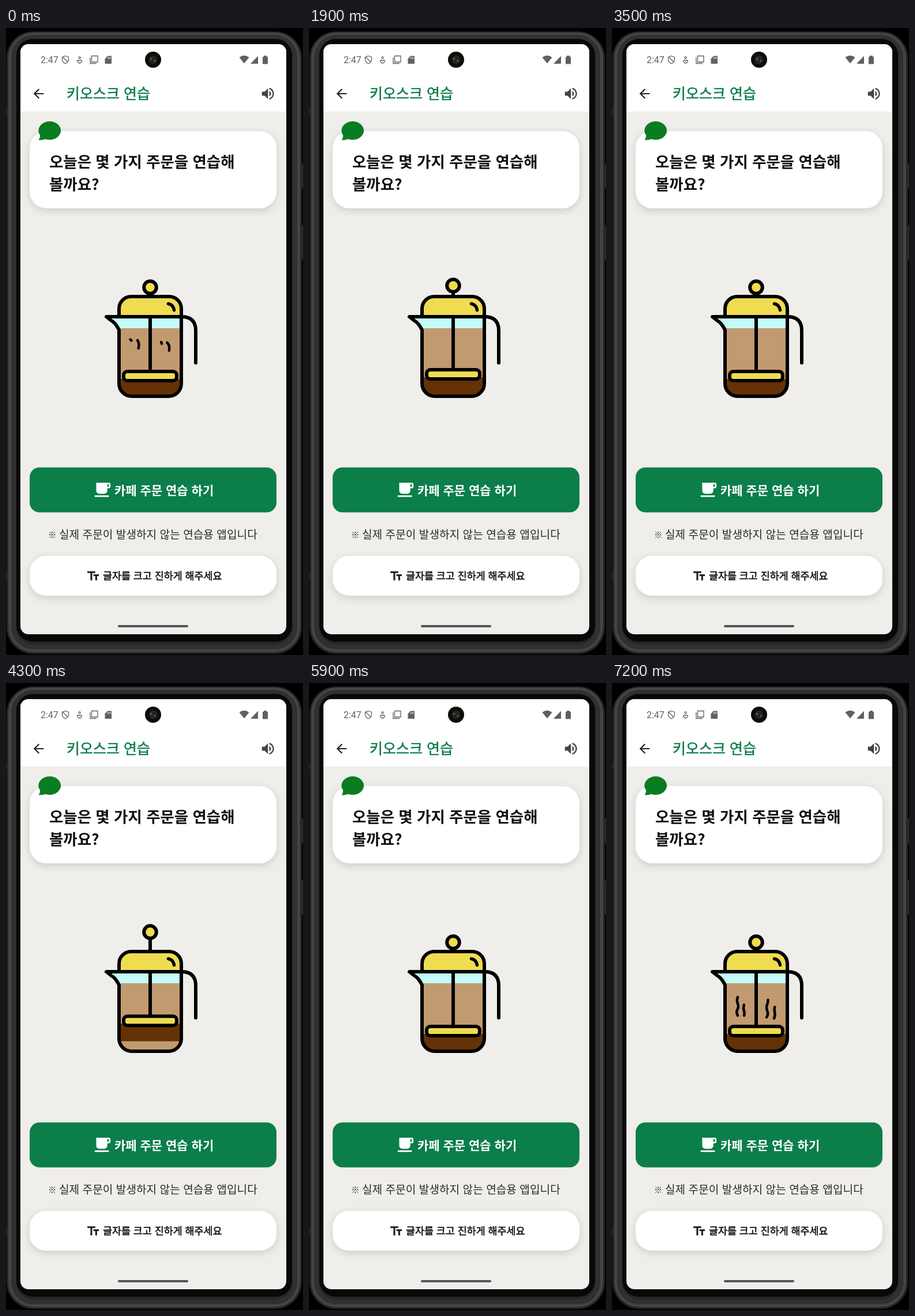
An HTML page for the animation above (7.3 s loop, 515 by 1088 pixels).

```html
<!DOCTYPE html>
<html lang="ko">
<head>
<meta charset="utf-8">
<title>키오스크 연습</title>
<style>
html, body { margin: 0; width: 100%; height: 100%; overflow: hidden; background: #000; }
svg { display: block; width: 100%; height: 100%; }
text { font-family: "Noto Sans CJK KR", "Noto Sans KR", "Noto Sans CJK", "Noto Sans CJK JP", sans-serif; white-space: pre; }
.clock { font: 16px Roboto, sans-serif; }
.medium { stroke: currentColor; stroke-width: .55; fill: currentColor; }
.card { fill: #fff; filter: drop-shadow(0 4px 7px rgba(0, 0, 0, .14)); }
.ink { fill: none; stroke: #000; stroke-width: 6; stroke-linecap: round; stroke-linejoin: round; }
.gold { fill: #efdc50; }
.wave { fill: none; stroke: #000; stroke-width: 4.5; stroke-linecap: round; }
</style>
</head>
<body>
<svg viewBox="0 0 515 1088" preserveAspectRatio="none">
  <defs>
    <clipPath id="screen"><rect x="25" y="28" width="461" height="1024" rx="14"/></clipPath>
    <clipPath id="glass"><path d="M172 501H304V617a22 22 0 0 1-22 22H218a22 22 0 0 1-22-22V524Q190 512 183 508Z"/></clipPath>
  </defs>

  <!-- phone body -->
  <rect width="515" height="1088" fill="#000"/>
  <g fill="#2b2b2b">
    <rect x="511" y="235" width="4" height="43"/>
    <rect x="511" y="342" width="4" height="60"/>
    <rect x="0" y="139" width="4" height="11"/>
    <rect x="0" y="946" width="4" height="11"/>
  </g>
  <rect x="1" y="6" width="512" height="1080" rx="46" fill="#262626"/>
  <g fill="none">
    <rect x="6.500" y="10.500" width="501" height="1070" rx="41" stroke="#444" stroke-width="5"/>
    <rect x="13" y="16" width="488" height="1058" rx="35" stroke="#303030" stroke-width="8"/>
  </g>
  <rect x="18" y="19" width="478" height="1046" rx="28" fill="#080808"/>

  <g clip-path="url(#screen)">
    <rect x="25" y="28" width="461" height="1024" fill="#efeeea"/>
    <rect x="25" y="28" width="461" height="117" fill="#fff"/>

    <!-- status bar -->
    <g fill="#5f6062">
      <text class="clock" x="60" y="61">2:47</text>
      <path d="M413 61.5L404.500 51Q413 44.500 421.500 51Z"/>
      <path d="M424 62H437V48.500Z"/>
      <path d="M445 50h2v-2h5v2h2v12.500h-9Z"/>
      <path d="M171.500 53.500L176 48.500h7v13.500h-11.500Z"/>
      <path d="M176.500 50.500v3M178.800 50.500v3M181 50.500v3" stroke="#fff"/>
    </g>
    <g fill="none" stroke="#5f6062" stroke-width="1.300">
      <path d="M103 48.500l5.500 2v4q0 5-5.500 7.500q-5.500-2.500-5.500-7.500v-4ZM98.500 50.500l8 8"/>
      <circle cx="127.500" cy="51.500" r="1.700"/>
      <path d="M127.500 57q-2.500-2.500-4 0q0 2 4 4.500q4-2.500 4-4.500q-1.500-2.500-4 0Z"/>
      <path d="M148.500 48.500h10.500v10.500h-10.500ZM146 51v10.500h11"/>
    </g>
    <circle cx="255" cy="55" r="14" fill="#0c0c0c"/>
    <circle cx="255" cy="55" r="7.500" fill="#25231c"/>
    <circle cx="251.500" cy="53.500" r="2" fill="#5b553c"/>
    <circle cx="258" cy="57" r="1.500" fill="#6a634c"/>

    <!-- app bar -->
    <path transform="translate(43.300 100.800) scale(1.1)" fill="#222" d="M20 11H7.830l5.590-5.590L12 4l-8 8 8 8 1.410-1.410L7.830 13H20z"/>
    <text class="medium" x="105" y="122.500" font-size="25" color="#0c7d49">키오스크 연습</text>
    <path transform="translate(440.300 100) scale(1.16)" fill="#444" d="M3 9v6h4l5 5V4L7 9zm13.500 3c0-1.770-1.020-3.290-2.500-4.030v8.050c1.480-.73 2.500-2.250 2.500-4.020zM14 3.230v2.060c2.890.86 5 3.540 5 6.710s-2.110 5.850-5 6.710v2.060c4.010-.91 7-4.490 7-8.770s-2.990-7.860-7-8.770z"/>

    <!-- question -->
    <rect class="card" x="41" y="179" width="428" height="134" rx="29"/>
    <g fill="#0a7c22">
      <ellipse cx="75.700" cy="178" rx="19.400" ry="16"/>
      <path d="M59 183Q60 190 56.500 194.500Q65 195 70 191.500Z"/>
    </g>
    <g font-size="26.450" font-weight="700" fill="#111">
      <text x="75" y="241.500">오늘은 몇 가지 주문을 연습해</text>
      <text x="75" y="280.500">볼까요?</text>
    </g>

    <!-- french press -->
    <g clip-path="url(#glass)">
      <rect x="170" y="500" width="136" height="22" fill="#c3fbf8"/>
      <rect x="194" y="521" width="112" height="120" fill="#c29a70"/>
      <rect class="lift" x="196" y="609" width="108" height="30.500" fill="#643205"/>
    </g>
    <g class="lift">
      <path class="ink" d="M250 462V598"/>
      <circle class="ink" style="fill:#efdc50" cx="250" cy="450" r="10.800"/>
      <rect class="ink" style="fill:#efdc50" x="204" y="596" width="92" height="16" rx="6.500"/>
    </g>
    <path class="gold" d="M196 501V487a21 21 0 0 1 21-21H283a21 21 0 0 1 21 21V501Z"/>
    <g class="ink">
      <path d="M196 501V487a21 21 0 0 1 21-21H283a21 21 0 0 1 21 21V617a22 22 0 0 1-22 22H218a22 22 0 0 1-22-22V524Q190 512 183 508L174 501H306Q329 502 329 525V581"/>
      <path d="M281.500 478.500Q290 480 291.500 489.500" stroke-width="5.500"/>
    </g>
    <g id="steam">
      <path class="wave" pathLength="1" d="M218 577C213 569 220 566 219 560C218 554 215 553 218 545C218 543 217 541 215.500 540.500"/>
      <path class="wave" pathLength="1" d="M229 577C232 570 226 567 228.500 561C229 556 233 549 228 542"/>
      <path class="wave" pathLength="1" d="M268 580C273 573 268 569 268 563C268 557 273 554 269 545"/>
      <path class="wave" pathLength="1" d="M281 582C285 574 280 569 282 563C284 556 284 550 279.500 546"/>
    </g>

    <!-- actions -->
    <rect x="41" y="762.500" width="428" height="78" rx="17" fill="#0b7e4a"/>
    <path transform="translate(151 785) scale(1.370)" fill="#fff" d="M20 3H4v10c0 2.210 1.790 4 4 4h6c2.210 0 4-1.790 4-4v-3h2c1.110 0 2-.9 2-2V5c0-1.110-.89-2-2-2zm0 5h-2V5h2zM2 21h18v-2H2z"/>
    <text x="188" y="810" font-size="21" font-weight="700" fill="#fff">카페 주문 연습 하기</text>
    <g fill="#2a2a2a">
      <text x="73" y="884.500" font-size="14.500" font-weight="700">※</text>
      <text x="92" y="885.500" font-size="19.150">실제 주문이 발생하지 않는 연습용 앱입니다</text>
    </g>
    <rect class="card" x="41" y="916" width="428" height="69" rx="28"/>
    <path transform="translate(138.500 938.500) scale(1.050)" fill="#222" d="M2.500 4v3h5v12h3V7h5V4zm19 5h-9v3h3v7h3v-7h3z"/>
    <text class="medium" x="168" y="957" font-size="17.400" color="#111">글자를 크고 진하게 해주세요</text>
    <rect x="194" y="1036" width="122" height="4" rx="2" fill="#565656"/>
  </g>
</svg>
<script>
const LOOP = 7300, CYCLE = 2500, TICK = 100, TRAVEL = 91;
const lifted = document.querySelectorAll('.lift');
const waves = document.querySelectorAll('.wave');
const ramp = (t, a, b) => Math.min(1, Math.max(0, (t - a) / (b - a)));
const ease = x => (1 - Math.cos(Math.PI * x)) / 2;

function drawWave(wave, t, delay) {
  const end = ramp(t, 1960 + delay, 2240 + delay);
  const start = ramp(t, 2240 + delay, 2520 + delay);
  wave.style.display = end > start ? '' : 'none';
  wave.setAttribute('stroke-dasharray', `${end - start} 3`);
  wave.setAttribute('stroke-dashoffset', -start);
}

function draw(time) {
  const t = Math.floor(time % LOOP / TICK) * TICK % CYCLE;
  const lift = ease(ramp(t, 1000, 1400)) - ease(ramp(t, 1400, 1965));
  lifted.forEach(el => el.setAttribute('transform', `translate(0 ${-TRAVEL * lift})`));
  // the last wisps run past the end of a cycle
  const steamTime = t < 500 ? t + CYCLE : t;
  waves.forEach((wave, i) => drawWave(wave, steamTime, i % 2 ? 90 : 0));
}

const begin = performance.now();
function tick() {
  draw(performance.now() - begin);
  requestAnimationFrame(tick);
}
tick();
</script>
</body>
</html>
```
